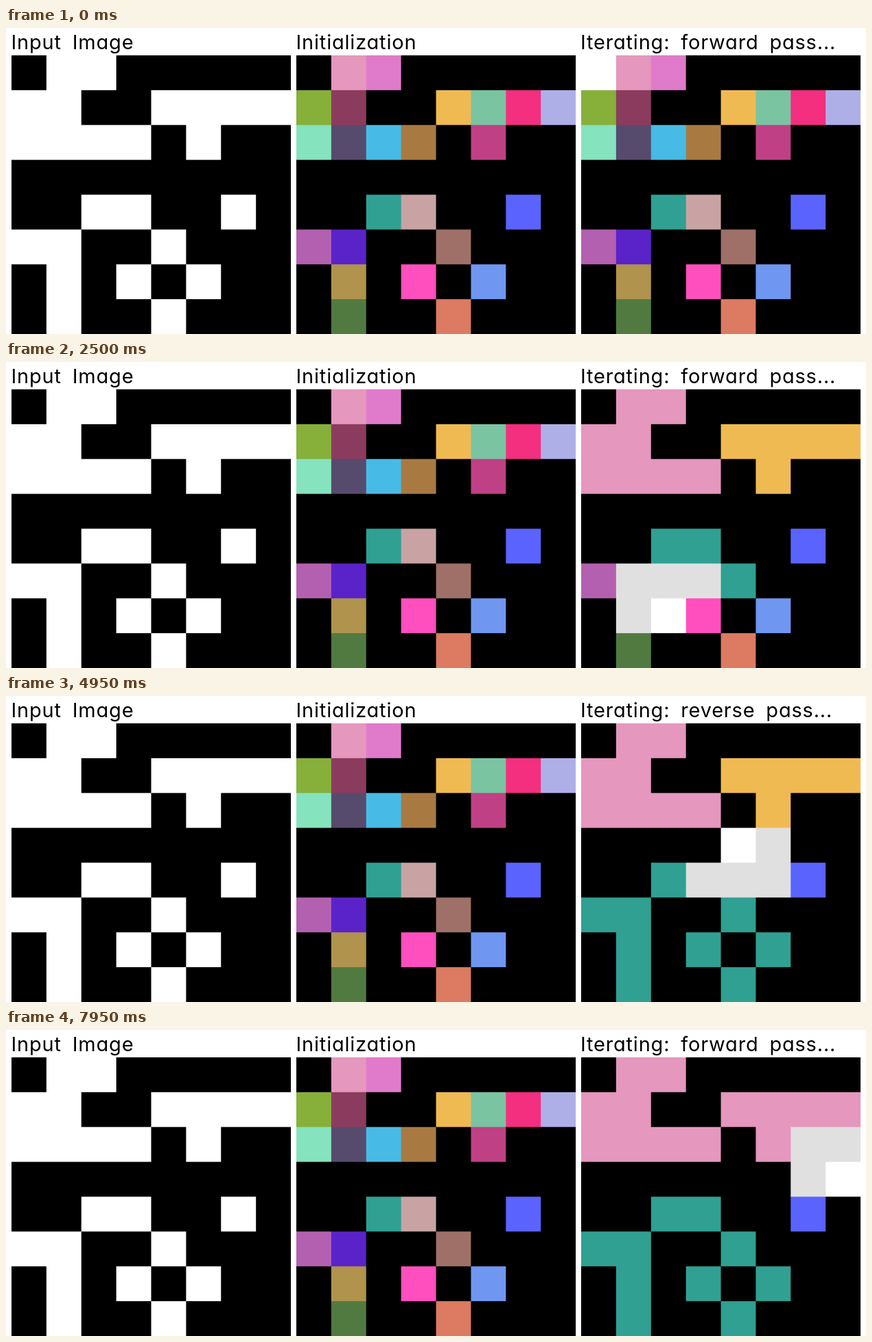
These frames come from a looping animation (1253 by 447 pixels, 8000 ms). An HTML page with a canvas:

```html
<!DOCTYPE html>
<html lang="en">
<head>
<meta charset="utf-8">
<title>Connected component labelling</title>
<style>
  html, body { margin: 0; width: 100%; height: 100%; overflow: hidden; background: #fff; }
  canvas { position: absolute; left: 0; top: 0; display: block; }
  .title {
    position: absolute; top: 1px; white-space: pre; color: #000;
    font: 400 29px/40px Inter, "Open Sans", sans-serif;
    font-feature-settings: "cv11"; font-optical-sizing: none;
    letter-spacing: 0.8px; word-spacing: 7px;
  }
  #input { left: 7.5px; }
  #init { left: 422.5px; }
  #pass { left: 837px; }
</style>
</head>
<body>
<canvas id="stage" width="1253" height="447"></canvas>
<div class="title" id="input">Input Image</div>
<div class="title" id="init">Initialization</div>
<div class="title" id="pass">Iterating: forward pass...</div>
<script>
const N = 8, CELLS = N * N, CELL = 51, TOP = 40;
const STEP = 50, LOOP = 8000;
const PANELS = [8, 424, 840];

const mask = [
  '01100000',
  '11001111',
  '11110100',
  '00000000',
  '00110010',
  '11001000',
  '01010100',
  '01001000'
].join('');

// Index 0 is the background; labels count up in raster order.
const colors = ['#000',
  '#e597bd', '#e07bcb', '#86b03a', '#8b3c5e', '#f0ba52', '#7ac4a2',
  '#f42f80', '#afafe8', '#85e3bd', '#574b6d', '#47bbe5', '#a87a42',
  '#c04085', '#2fa092', '#c9a3a3', '#5b63ff', '#b360b1', '#5a23c9',
  '#9e7068', '#b0934c', '#ff4fbe', '#6f97f1', '#517a41', '#dc7a62'];

let count = 0;
const initial = [...mask].map(bit => bit === '1' ? ++count : 0);

// Whole-pixel cells are drawn on a sheet, then scaled smoothly to the stage.
const stage = document.getElementById('stage');
const view = stage.getContext('2d');
const sheet = document.createElement('canvas');
sheet.width = 1256;
sheet.height = 448;
const ctx = sheet.getContext('2d');
ctx.fillStyle = '#fff';
ctx.fillRect(0, 0, sheet.width, sheet.height);

const title = document.getElementById('pass');

function fillCell(left, i, color) {
  const col = i % N, row = Math.floor(i / N);
  ctx.fillStyle = color;
  ctx.fillRect(left + col * CELL, TOP + row * CELL, CELL, CELL);
}

function drawGrid(left, colorAt) {
  for (let i = 0; i < CELLS; i++) fillCell(left, i, colorAt(i));
}

const isReverse = step => Math.floor(step / CELLS) % 2 === 1;

function cursorAt(step) {
  const i = step % CELLS;
  return isReverse(step) ? CELLS - 1 - i : i;
}

// The four 8-connected neighbours already visited in this pass.
function visited(step) {
  const dir = isReverse(step) ? -1 : 1;
  const at = cursorAt(step), col = at % N, row = Math.floor(at / N);
  return [[-1, -1], [0, -1], [1, -1], [-1, 0]]
    .map(([dx, dy]) => [col + dx * dir, row + dy * dir])
    .filter(([x, y]) => x >= 0 && x < N && y >= 0 && y < N)
    .map(([x, y]) => y * N + x);
}

function labelsBefore(step) {
  const labels = initial.slice();
  for (let s = 0; s < step; s++) {
    const at = cursorAt(s);
    if (!labels[at]) continue;
    const near = visited(s).map(i => labels[i]).filter(Boolean);
    labels[at] = Math.min(labels[at], ...near);
  }
  return labels;
}

function draw(step) {
  const labels = labelsBefore(step);
  drawGrid(PANELS[2], i => colors[labels[i]]);
  visited(step).forEach(i => fillCell(PANELS[2], i, '#e0e0e0'));
  fillCell(PANELS[2], cursorAt(step), '#fff');
  view.drawImage(sheet, 0, 0, stage.width, stage.height);
  title.textContent = `Iterating: ${isReverse(step) ? 'reverse' : 'forward'} pass...`;
}

drawGrid(PANELS[0], i => initial[i] ? '#fff' : '#000');
drawGrid(PANELS[1], i => colors[initial[i]]);
draw(0);

const start = performance.now();
let shown = 0;

function tick() {
  const step = Math.floor((performance.now() - start) % LOOP / STEP);
  if (step !== shown) draw(shown = step);
  requestAnimationFrame(tick);
}
requestAnimationFrame(tick);
</script>
</body>
</html>
```
